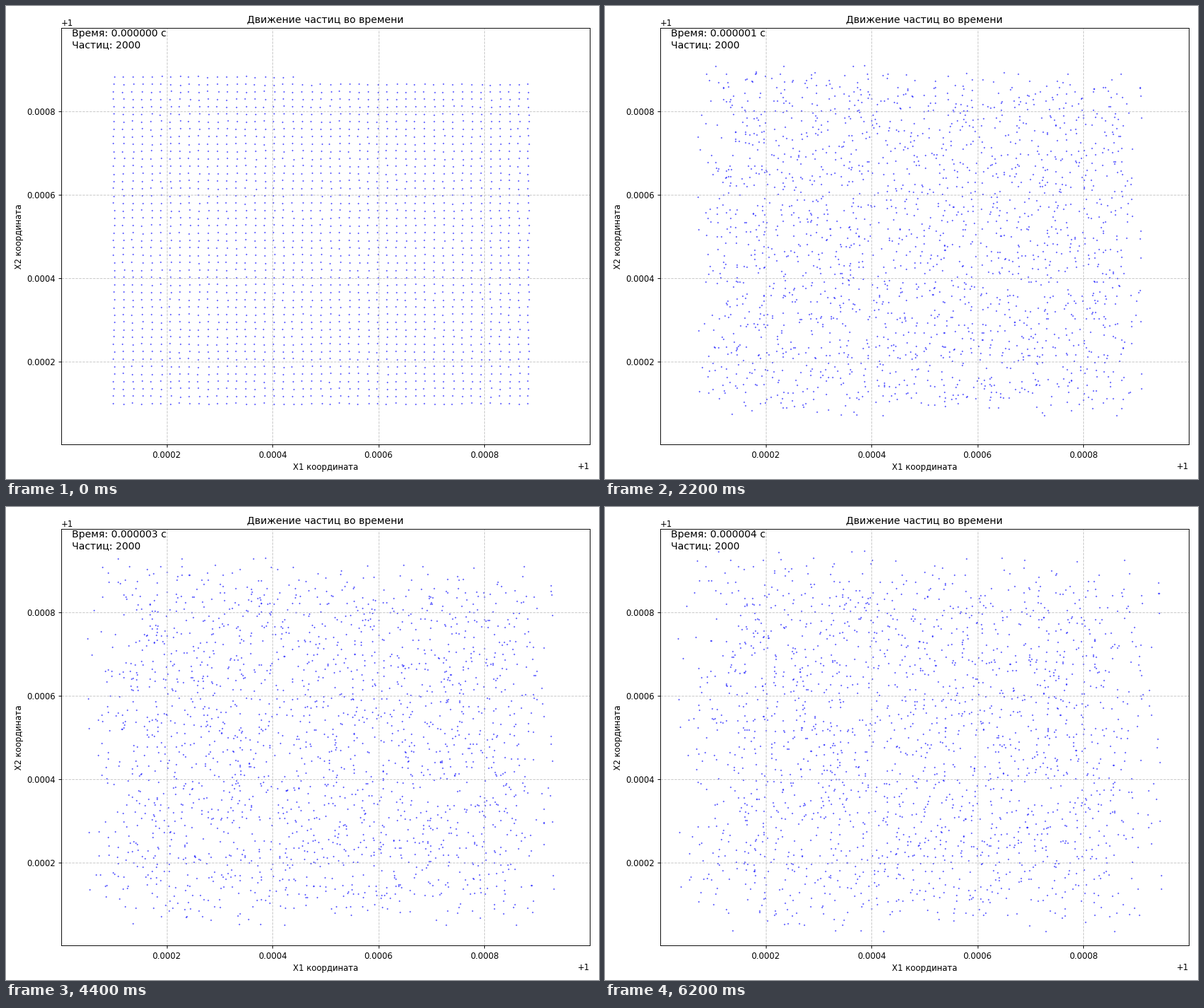
A matplotlib script that plays this animation: 837x669 px, repeating every 6400 ms.

```python
import matplotlib.pyplot as plt
import numpy as np
from matplotlib.animation import FuncAnimation

WIDTH, HEIGHT, DPI = 837, 669, 83.7
FRAMES, INTERVAL = 32, 200
COUNT, SIDE = 2000, 45
SPACING = 0.0008 / SIDE
FRAME_TIME = 1.35e-7

# A row-by-row lattice with slight jitter; each particle has its own heading
rng = np.random.default_rng(11)
index = np.arange(COUNT)
lattice = np.column_stack([index % SIDE, index // SIDE])
start = 1.0001 + SPACING * (lattice + rng.uniform(-0.1, 0.1, (COUNT, 2)))
angles = rng.uniform(0, 2 * np.pi, COUNT)
headings = np.column_stack([np.cos(angles), np.sin(angles)])


def travelled(frame):
    """Distance from the start: a quick burst that settles to a steady drift."""
    return SPACING * (0.102 * frame + 0.42 * (1 - np.exp(-frame / 4)))


fig, ax = plt.subplots(figsize=((WIDTH + 0.01) / DPI, (HEIGHT + 0.01) / DPI), dpi=DPI)
fig.subplots_adjust(left=78 / WIDTH, right=824.2 / WIDTH,
                    bottom=1 - 620.5 / HEIGHT, top=1 - 31.2 / HEIGHT)
ax.set(xlim=(1.000001, 1.000999), ylim=(1.000001, 1.000999))
ax.set_xlabel("X1 координата", labelpad=3.4)
ax.set_ylabel("X2 координата")
ax.set_title("Движение частиц во времени", pad=6.6)
ax.grid(True, linestyle="--", alpha=0.7)

dots = ax.scatter(start[:, 0], start[:, 1], s=2.6, c="blue", alpha=0.8, linewidths=0)
label = ax.text(0.02, 0.952, "", transform=ax.transAxes, fontsize=12)


def update(frame):
    dots.set_offsets(start + headings * travelled(frame))
    label.set_text(f"Время: {frame * FRAME_TIME:.6f} с\nЧастиц: {COUNT}")
    return dots, label


anim = FuncAnimation(fig, update, frames=FRAMES, interval=INTERVAL,
                     repeat=True, repeat_delay=0)
plt.show()
```
